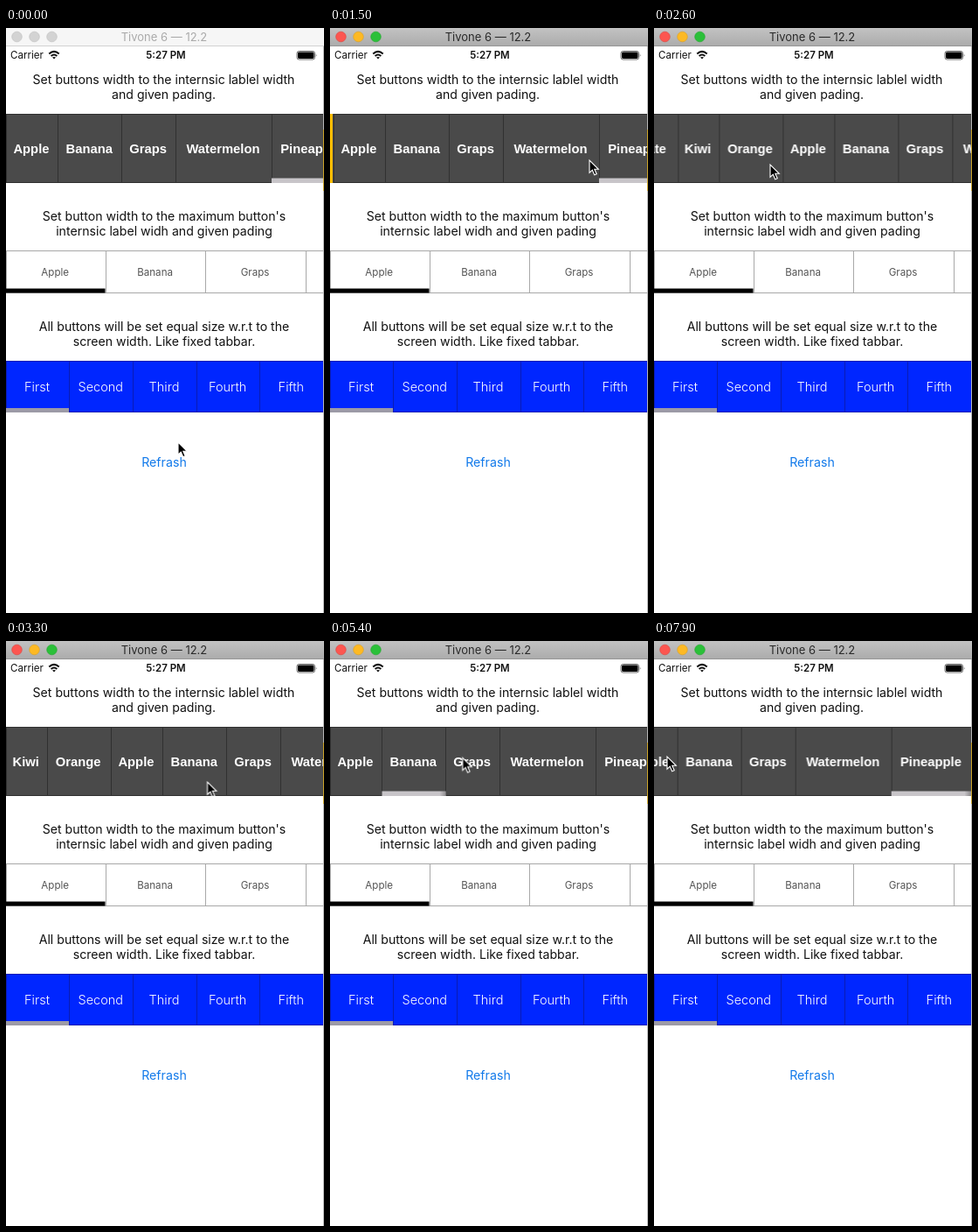
Recreate the animation shown at these times as an HTML page. Size 364 px wide and 668 px high, loop 8 s.

```html
<!DOCTYPE html>
<html lang="en">
<head>
<meta charset="utf-8">
<title>Button bars</title>
<style>
  html, body { margin: 0; width: 100%; height: 100%; overflow: hidden; background: #fff; }
  svg { display: block; width: 364px; height: 668px; }
  text { font-family: Inter, Roboto, sans-serif; text-anchor: middle; }
  .note { font-size: 14.12px; fill: #111; }
  .fruit { font: bold 14.8px "Liberation Sans", Arial, sans-serif; fill: #fff; }
  .even { font-size: 11.6px; fill: #555; }
  .fixed { font-size: 14.5px; font-weight: 300; fill: #fff; }
  .title { font-size: 13px; }
  .cell { fill: none; shape-rendering: crispEdges; }

  #active, #strip, #mark, #cursor { animation: 8s linear infinite; }
  #active { animation-name: wake; animation-timing-function: step-end; }
  #strip { animation-name: scroll; }
  #mark { animation-name: mark; animation-timing-function: ease-in-out; }
  #cursor { animation-name: point; animation-timing-function: ease-in-out; }

  @keyframes wake { 0% { opacity: 0; } 10% { opacity: 1; } 100% { opacity: 1; } }

  @keyframes scroll {
    0%, 10.5% { transform: translateX(0); animation-timing-function: ease-out; }
    15% { transform: translateX(55px); animation-timing-function: cubic-bezier(.3, .5, .5, 1); }
    18.75% { transform: translateX(4px); animation-timing-function: ease-out; }
    20.5%, 21.25% { transform: translateX(0); animation-timing-function: ease-in; }
    25% { transform: translateX(-164px); animation-timing-function: cubic-bezier(.25, .5, .6, .95); }
    32.5% { transform: translateX(-487.5px); animation-timing-function: ease-out; }
    38.75%, 41.25% { transform: translateX(-515px); animation-timing-function: ease-in; }
    44.4% { transform: translateX(-406px); animation-timing-function: linear; }
    49.4% { transform: translateX(0); animation-timing-function: ease-out; }
    51% { transform: translateX(28px); animation-timing-function: cubic-bezier(.3, .5, .5, 1); }
    55% { transform: translateX(.7px); }
    56.5%, 83.2% { transform: translateX(0); animation-timing-function: ease-in-out; }
    87%, 100% { transform: translateX(-32.3px); }
  }

  @keyframes mark {
    0%, 57.5% { transform: translateX(304px) scaleX(92); }
    60.5%, 63.75% { transform: translateX(0) scaleX(59.5); }
    66.75%, 69.5% { transform: translateX(59.5px) scaleX(73); }
    72.5%, 75.6% { transform: translateX(132.5px) scaleX(62); }
    78.6%, 83.2% { transform: translateX(194.5px) scaleX(109.5); }
    86.2%, 100% { transform: translateX(304px) scaleX(92); }
  }

  @keyframes point {
    0%, 2% { transform: translate(197px, 473px); }
    9.5%, 10.5% { transform: translate(150px, 150px); }
    15%, 21.25% { transform: translate(297px, 151px); animation-timing-function: ease-in; }
    25%, 33.5% { transform: translate(133px, 156px); }
    40%, 41.25% { transform: translate(230.5px, 161px); animation-timing-function: ease-in; }
    44.4%, 46% { transform: translate(340px, 150px); }
    54.5%, 58.5% { transform: translate(43px, 135px); }
    63%, 65% { transform: translate(95px, 135px); }
    68.5%, 70.5% { transform: translate(163px, 133px); }
    75%, 77% { transform: translate(249px, 132px); }
    81%, 84.5% { transform: translate(319px, 131px); }
    97%, 100% { transform: translate(15px, 132px); }
  }
</style>
</head>
<body>
<svg viewBox="0 0 364 668">
  <defs>
    <linearGradient id="bar" x2="0" y2="1">
      <stop stop-color="#c2c2c2"/><stop offset="1" stop-color="#acacac"/>
    </linearGradient>
  </defs>
  <rect width="364" height="668" fill="#fff"/>

  <!-- title bar, idle and active -->
  <g>
    <rect width="364" height="20" fill="#f6f6f6"/>
    <rect y="20" width="364" height="1" fill="#d2d2d2"/>
    <g fill="#d3d3d3" stroke="#bdbdbd" stroke-width=".6">
      <circle cx="12.5" cy="10" r="5.8"/><circle cx="32.5" cy="10" r="5.8"/><circle cx="52.5" cy="10" r="5.8"/>
    </g>
    <text class="title" x="181" y="15" fill="#aaa">Tivone 6 — 12.2</text>
  </g>
  <g id="active">
    <rect width="364" height="20" fill="url(#bar)"/>
    <rect y="20" width="364" height="1" fill="#969696"/>
    <g stroke-width=".6">
      <circle cx="12.5" cy="10" r="5.8" fill="#fc5650" stroke="#dd3f3a"/>
      <circle cx="32.5" cy="10" r="5.8" fill="#fdb924" stroke="#dba01f"/>
      <circle cx="52.5" cy="10" r="5.8" fill="#2bc039" stroke="#1ea52b"/>
    </g>
    <text class="title" x="181" y="15" fill="#2a2a2a">Tivone 6 — 12.2</text>
  </g>

  <!-- status bar -->
  <text x="24" y="35" font-size="11.6" fill="#111">Carrier</text>
  <text x="183" y="35" font-size="11.5" font-weight="600" fill="#111">5:27 PM</text>
  <g fill="none" stroke="#111" stroke-width="2">
    <path d="M49.3 29.4Q55 24.4 60.7 29.4M51.6 32Q55 29 58.4 32"/>
    <path d="M55 35.6L53 33.6Q55 32.2 57 33.6Z" fill="#111" stroke="none"/>
  </g>
  <rect x="333" y="26.5" width="20.5" height="9.5" rx="2.4" fill="none" stroke="#555" stroke-width=".9"/>
  <rect x="334" y="27.5" width="18.5" height="7.5" rx="1.4" fill="#000"/>
  <path d="M354.8 29.6q1.6 1.6 0 3.3z" fill="#555"/>

  <g class="note">
    <text x="180.5" y="64">Set buttons width to the internsic lablel width</text>
    <text x="180.5" y="81">and given pading.</text>
    <text x="181" y="220">Set button width to the maximum button's</text>
    <text x="181" y="237">internsic label widh and given pading</text>
    <text x="181" y="346">All buttons will be set equal size w.r.t to the</text>
    <text x="181" y="363">screen width. Like fixed tabbar.</text>
  </g>

  <!-- scrolling bar -->
  <rect y="98" width="364" height="79" fill="#ffbe00"/>
  <g id="strip">
    <rect x="-1" y="98" width="1400" height="79" fill="#4a4a4a"/>
    <g id="fruits"></g>
    <rect id="mark" y="171.5" width="1" height="5.5" fill="#c8c5c9"/>
  </g>

  <!-- even bar -->
  <g id="evens"></g>
  <rect y="297.5" width="113.5" height="5" fill="#000"/>

  <!-- fixed bar -->
  <rect y="380" width="364" height="59" fill="#0026ff"/>
  <g id="fixeds"></g>
  <rect y="434" width="72" height="5" fill="#9c9aa6"/>

  <text x="181" y="501" font-size="14.2" fill="#1179ea">Refrash</text>

  <!-- window edge -->
  <rect x="363" y="21" width="1" height="647" fill="#b4b4b4"/>
  <rect x="363" y="116" width="1" height="70" fill="#c9a227"/>

  <path id="cursor" d="M0 0V14.2L3.3 11.2L5.7 16.8L8.2 15.7L5.8 10.3H10.3Z"
        fill="#000" stroke="#fff" stroke-width="1.1"/>
</svg>
<script>
  const NS = "http://www.w3.org/2000/svg";

  function add(parent, tag, attrs, label = "") {
    const el = document.createElementNS(NS, tag);
    for (const key in attrs) el.setAttribute(key, attrs[key]);
    el.textContent = label;
    parent.append(el);
  }

  // Lays outlined buttons side by side, neighbours sharing an edge.
  function buttons(id, cls, names, widthOf, top, height, baseline, stroke, shift) {
    const group = document.getElementById(id);
    let x = 0;
    for (const name of names) {
      const w = widthOf(name);
      add(group, "rect", { class: "cell", x, y: top + 0.5, width: w, height: height - 1, stroke });
      add(group, "text", { class: cls, x: x + w / 2 + shift, y: baseline }, name);
      x += w;
    }
  }

  const widths = {
    Apple: 59.5, Banana: 73, Graps: 62, Watermelon: 109.5,
    Pineapple: 92, Pomegranate: 119, Kiwi: 47, Orange: 73
  };
  const fruits = Object.keys(widths);
  buttons("fruits", "fruit", [...fruits, ...fruits.slice(0, 5)], n => widths[n], 98, 79, 143, "#303030", -0.8);
  buttons("evens", "even", fruits.slice(0, 4), () => 114.4, 254, 49, 283, "#a8a8a8", -1);
  buttons("fixeds", "fixed", ["First", "Second", "Third", "Fourth", "Fifth"], () => 72.7, 380, 59, 415, "#0a1cb4", -0.8);
</script>
</body>
</html>
```
